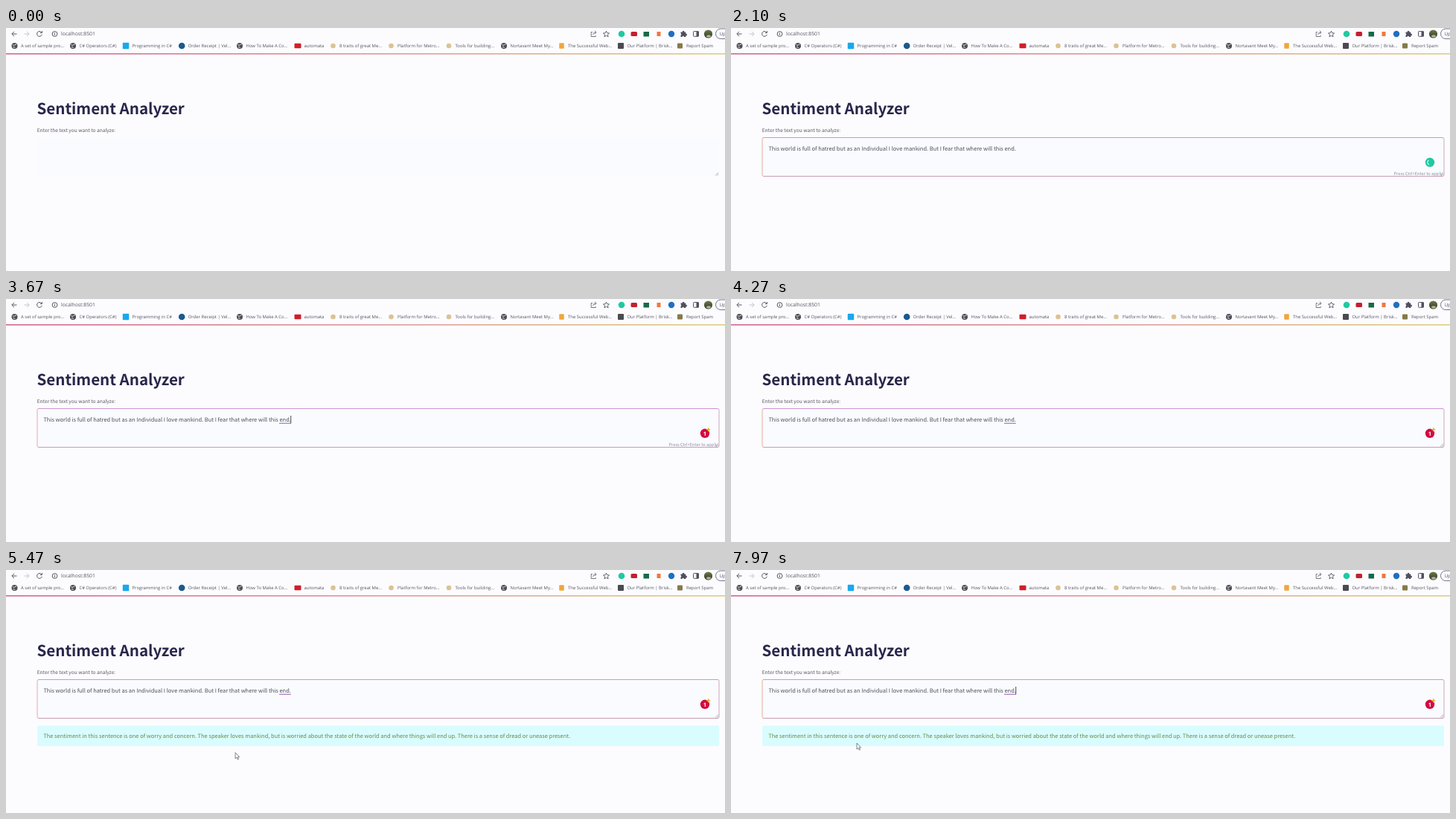
An HTML page for the animation above (8000 ms loop, 966x327 px).

```html
<!DOCTYPE html>
<html lang="en">
<head>
<meta charset="utf-8">
<title>Sentiment Analyzer</title>
<style>
html, body { margin: 0; width: 100%; height: 100%; overflow: hidden; background: #fcfcff; }
svg { display: block; width: 100%; height: 100%; }
text { text-rendering: geometricPrecision; white-space: pre; }
.ui { font-family: "Open Sans", "Noto Sans", sans-serif; fill: #53535f; }
.page { font-family: "Noto Sans CJK JP", "Noto Sans CJK SC", "Noto Sans CJK", "Open Sans", sans-serif; }
.line { fill: none; stroke: #555562; stroke-width: 1; }
</style>
</head>
<body>
<svg id="stage" viewBox="0 0 966 327" xmlns="http://www.w3.org/2000/svg">
  <defs>
    <linearGradient id="deco">
      <stop offset="0" stop-color="#cf5f86"/>
      <stop offset=".5" stop-color="#dc9096"/>
      <stop offset="1" stop-color="#dccb78"/>
    </linearGradient>
    <linearGradient id="photo" x2="0" y2="1">
      <stop offset="0" stop-color="#6c7d4a"/>
      <stop offset="1" stop-color="#2f3428"/>
    </linearGradient>
  </defs>
  <rect width="966" height="327" fill="#fcfcff"/>

  <g id="toolbar">
    <path class="line" d="M14.5 8H8M11 4.8L7.8 8l3.2 3.2"/>
    <path class="line" style="stroke:#c3c3cc" d="M24.5 8H31M28 4.8l3.2 3.2l-3.2 3.2"/>
    <path class="line" d="M47.7 5.8A3.4 3.4 0 1 0 48.3 8.8M48.4 4v2.5H45.9"/>
    <circle class="line" cx="65.5" cy="8" r="3.4"/>
    <path class="line" d="M65.5 7.4v2.4M65.5 5.9v.8"/>
    <text class="ui" x="74" y="10.4" font-size="6.8">localhost:8501</text>
    <path class="line" style="stroke-width:.8" d="M788 5.5h-1.8v6h6V10M788.5 9q.5-3 4.2-3.2M790.8 3.7l2.3 2.1l-2.3 2.1"/>
    <path class="line" style="stroke-width:.9" d="M806.5 4l1.2 2.7l2.9.3l-2.2 1.9l.7 2.9l-2.6-1.5l-2.6 1.5l.7-2.9l-2.2-1.9l2.9-.3z"/>
    <circle cx="827" cy="8" r="4.3" fill="#22c9a0"/>
    <rect x="839.5" y="5" width="8.5" height="6" rx="1.5" fill="#c4202c"/>
    <rect x="856.5" y="5" width="7.5" height="6.5" fill="#176a48"/>
    <rect x="874.5" y="5" width="5" height="6" fill="#f0783c"/>
    <circle cx="894" cy="8" r="4.2" fill="#1f6fc0"/>
    <path fill="#50505c" d="M906.5 5.5h2.3a1.3 1.3 0 1 1 2.5 0h2v2.3a1.3 1.3 0 1 1 0 2.5v1.7h-2.4a1.2 1.2 0 0 0-2.4 0h-2v-2.3a1.3 1.3 0 0 0 0-2.4z"/>
    <rect class="line" x="923.5" y="4.5" width="7" height="6.8" rx=".8"/>
    <rect x="927.5" y="4.5" width="3.2" height="6.8" fill="#50505c"/>
    <circle cx="943.5" cy="8" r="5.6" fill="url(#photo)"/>
    <ellipse cx="944" cy="11" rx="3" ry="1.7" fill="#b5b39a"/>
    <rect x="953.5" y="1" width="40" height="13.5" rx="6.7" fill="#fafaff" stroke="#66667c" stroke-width=".9"/>
    <text class="ui" x="958.5" y="10.3" font-size="6.2">Up</text>
  </g>
  <g id="bookmarks"></g>

  <rect y="34" width="966" height="1.5" fill="url(#deco)"/>
  <text class="page" x="41.5" y="116.3" font-size="20.55" font-weight="700" fill="#27264a">Sentiment Analyzer</text>
  <text class="page" x="41.7" y="139.5" font-size="6.6" fill="#55555f">Enter the text you want to analyze:</text>

  <rect x="42" y="148" width="916" height="51.5" rx="2" fill="#fafbff"/>
  <g id="focus" fill="none" stroke-width="1">
    <path stroke="#e3ad98" d="M44 199.5q-2 0-2-2V149.500q0-2 2-2"/>
    <path stroke="#cb95d2" d="M43.500 147.500H956.500"/>
    <path stroke="#cfa6b8" d="M956 147.500q2 0 2 2v48q0 2-2 2"/>
    <path stroke="#c79db2" d="M43.500 199.500H956.500"/>
  </g>
  <path d="M953 198.500l4-4M955.500 198.500l1.800-1.800" stroke="#7d8f98" stroke-width=".7"/>

  <g id="entry">
    <text class="page" x="50.4" y="164.9" font-size="7.47" fill="#4d4f58">This world is full of hatred but as an Individual I love mankind. But I fear that where will this end.</text>
    <path id="flaw" d="M367 167.300h15.800" stroke="#b07cc8" stroke-width="1.3"/>
  </g>
  <rect id="caret" y="157" width=".9" height="10.3" fill="#33343c"/>
  <text id="hint" class="page" x="956" y="197.6" font-size="5.72" text-anchor="end" fill="#8b8b9c">Press Ctrl+Enter to apply</text>

  <g id="badge" transform="translate(939 180.8)">
    <circle id="disc" r="6.2"/>
    <path id="spin" d="M-3 -1.2A3.2 3.2 0 0 1 3 -1.2" fill="none" stroke="#fff" stroke-width="1.1"/>
    <text id="count" y="2.7" font-size="7.5" font-weight="700" text-anchor="middle" fill="#fff" font-family="Open Sans, sans-serif">1</text>
    <path id="plus" d="M4.7 -7.5v5M2.2 -5h5" stroke="#e4b32c" stroke-width="1.5"/>
  </g>

  <g id="answer">
    <rect x="42" y="209.5" width="916" height="27.5" rx="2" fill="#d9fcff"/>
    <text class="page" x="50.2" y="226" font-size="7.47" fill="#66893f">The sentiment in this sentence is one of worry and concern. The speaker loves mankind, but is worried about the state of the world and where things will end up. There is a sense of dread or unease present.</text>
  </g>
  <path id="pointer" d="M0 0V8.2L1.9 6.5L3.3 9.4L4.5 8.8L3.2 6H5.6Z" fill="#fff" stroke="#50505a" stroke-width=".7"/>
</svg>
<script>
const LOOP = 8000;
const FOCUS = 900, BADGE = 1150, PASTE = 1600, FLAG = 2200, COUNTED = 3200, SUBMIT = 3900, REPLY = 4330;
const $ = id => document.getElementById(id);
const show = (id, on) => $(id).setAttribute("visibility", on ? "visible" : "hidden");

const globe = x => `<circle cx="${x}" cy="24" r="4" fill="#4b4d54"/>
  <path d="M${x - 2.7} 22.3q1.8 2 3 .6t2.4-1M${x - 2} 25.8q2-.8 2.6 1" fill="none" stroke="#f2f2f6"/>`;
const dot = (color, r) => x => `<circle cx="${x}" cy="24" r="${r}" fill="${color}"/>`;
const box = (color, w, h) => x => `<rect x="${x - w / 2}" y="${24 - h / 2}" width="${w}" height="${h}" rx="1" fill="${color}"/>`;
const sand = dot("#dcc294", 3.3);

const bookmarks = [
  [20, "A set of sample pro...", globe],
  [98.5, "C# Operators (C#)", globe],
  [169.5, "Programming in C#", box("#18a8ec", 8.5, 8.5)],
  [244.7, "Order Receipt | Vel...", dot("#1c5a8c", 4.3)],
  [322.5, "How To Make A Co...", globe],
  [400.5, "automata", box("#cf1f2a", 9, 6.5)],
  [448, "8 traits of great Me...", sand],
  [526, "Platform for Metro...", sand],
  [603.5, "Tools for building...", sand],
  [677.5, "Nortavant Meet My...", globe],
  [755, "The Successful Web...", box("#f0a63c", 6.5, 7.5)],
  [834.5, "Our Platform | Brisk...", box("#4a4a50", 8, 8)],
  [914, "Report Spam", box("#857a48", 7, 7)]
];
$("bookmarks").innerHTML = bookmarks.map(([x, label, icon]) =>
  icon(x - 8.5) + `<text class="ui" x="${x}" y="26.3" font-size="5.95">${label}</text>`).join("");

// time, x, y of the pointer tip
const path = [
  [5350, 325, 225], [5620, 285, 274], [5900, 253, 264],
  [6560, 253, 264], [6760, 245, 258], [7600, 169, 233], [LOOP, 169, 233]
];

function pointerAt(t) {
  const i = path.findIndex(p => p[0] > t);
  const a = path[i - 1], b = path[i];
  const k = (t - a[0]) / (b[0] - a[0]);
  const e = k * k * (3 - 2 * k);
  return [a[1] + (b[1] - a[1]) * e, a[2] + (b[2] - a[2]) * e];
}

function draw(t) {
  const pasted = t >= PASTE, flagged = t >= FLAG, counted = t >= COUNTED, badge = t >= BADGE;
  show("focus", t >= FOCUS);
  show("entry", pasted);
  show("flaw", flagged);
  show("hint", pasted && t < SUBMIT);
  show("answer", t >= REPLY);

  const since = t - (pasted ? PASTE : FOCUS);
  show("caret", since >= 0 && since % 1000 < 500);
  $("caret").setAttribute("x", pasted ? 382.3 : 50.3);

  show("badge", badge);
  show("spin", badge && !counted);
  show("count", counted);
  show("plus", flagged);
  $("disc").setAttribute("fill", flagged ? "#d3093f" : "#1cc9a2");
  $("spin").setAttribute("transform", `rotate(${(t - 1370) * 360 / 1000})`);

  const moving = t >= path[0][0];
  show("pointer", moving);
  if (moving) $("pointer").setAttribute("transform", `translate(${pointerAt(t)})`);
}

const start = performance.now();
function tick() {
  draw((performance.now() - start) % LOOP);
  requestAnimationFrame(tick);
}
tick();
</script>
</body>
</html>
```
